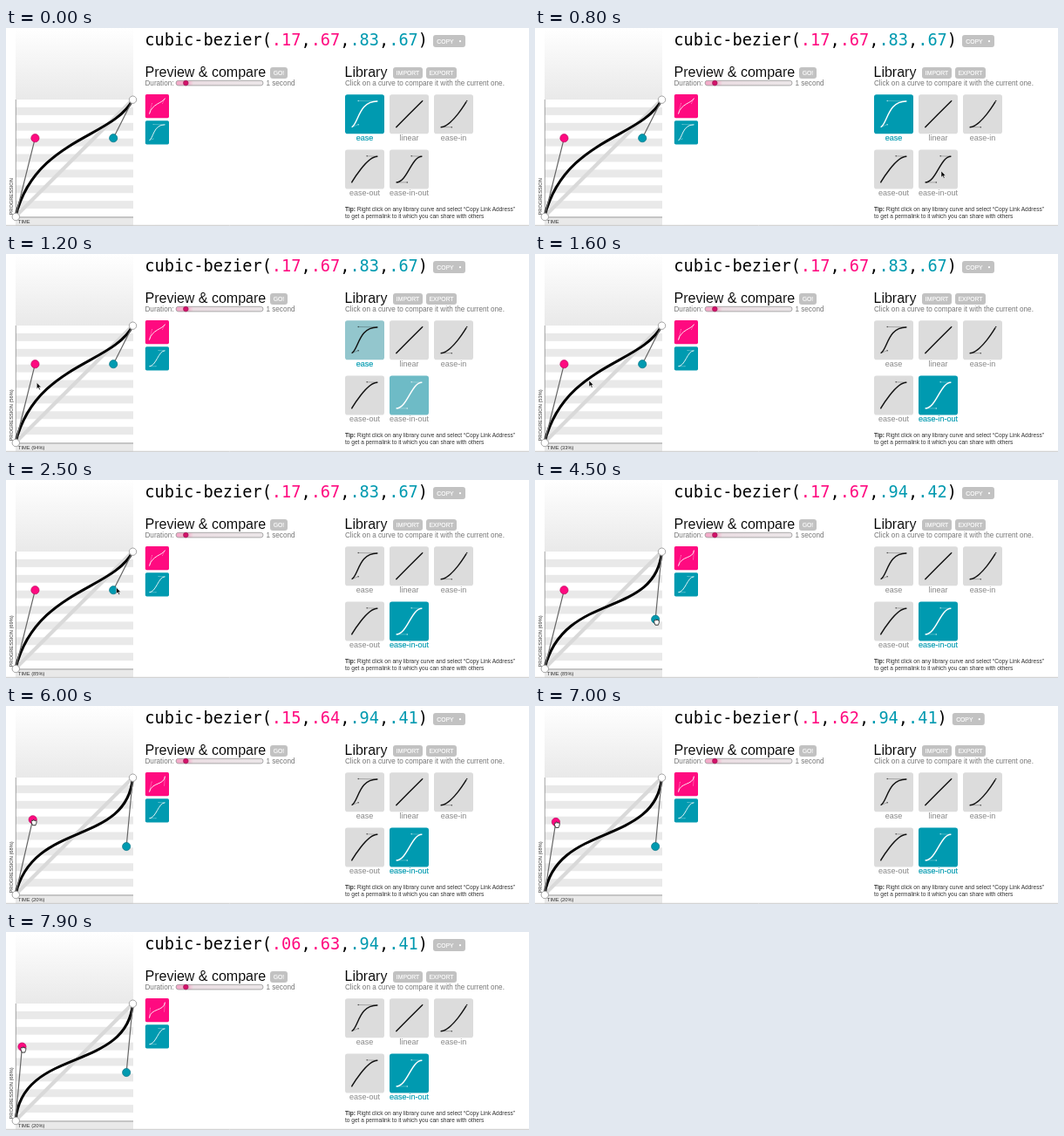
Animation, 600 px wide and 227 px high, one loop 8000 ms. Source, as an HTML page:

```html
<!DOCTYPE html>
<html lang="en">
<head>
<meta charset="utf-8">
<title>Cubic Bézier editor</title>
<style>
html, body { margin: 0; width: 100%; height: 100%; overflow: hidden; background: #fff; }
svg { display: block; width: 600px; height: 227px; font-family: "Liberation Sans", Arial, sans-serif; }
.code { font: 18.6px "DejaVu Sans Mono", monospace; white-space: pre; }
.head { font-size: 16px; fill: #000; stroke: #fff; stroke-width: .12px; }
.note { font-size: 8.13px; fill: #777; }
.tip { font-size: 6.55px; fill: #333; }
.axis { font-size: 5.7px; fill: #333; }
.name { font-size: 9px; text-anchor: middle; }
.btn rect { fill: #c2c2c2; }
.btn text { font-size: 6.8px; fill: #fff; text-anchor: middle; stroke: #fff; stroke-width: .15px; }
</style>
</head>
<body>
<svg id="stage" viewBox="0 0 600 227">
  <defs>
    <linearGradient id="shade" x2="0" y2="1">
      <stop stop-color="#fff"/><stop offset="1" stop-color="#e9e9e9"/>
    </linearGradient>
    <linearGradient id="rail">
      <stop stop-color="#f3a9c8"/><stop offset=".15" stop-color="#f0b9d0"/>
      <stop offset=".2" stop-color="#eadde2"/><stop offset="1" stop-color="#ebe6e8"/>
    </linearGradient>
  </defs>
  <rect x="11" width="135" height="82" fill="url(#shade)"/>
  <rect x="11" y="82" width="135" height="145" fill="#e9e9e9"/>
  <g id="stripes" fill="#fff"></g>
  <path d="M11 216L145.5 82" stroke="#d9d9d9" stroke-width="4.2"/>
  <path d="M11.3 82V217H146" fill="none" stroke="#999" stroke-width=".9"/>
  <path d="M0 226.3H600" stroke="#c8c8c8"/>
  <text id="prog" class="axis" transform="translate(8.2 214.5) rotate(-90)"></text>
  <text id="time" class="axis" x="14" y="223.6"></text>
  <path id="curve" fill="none" stroke="#000" stroke-width="3"/>
  <path id="stems" fill="none" stroke="#666" stroke-width="1.2"/>
  <g fill="#fff" stroke="#999" stroke-width=".9">
    <circle cx="11.3" cy="216.5" r="4.2"/><circle cx="145.5" cy="82.2" r="4.2"/>
  </g>
  <circle id="p1" r="4.6" fill="#ff0a80" stroke="#b8085c" stroke-width=".7"/>
  <circle id="p2" r="4.6" fill="#009ab0" stroke="#087484" stroke-width=".7"/>

  <text class="code" id="code" x="159.3" y="20"></text>
  <g class="btn" id="copy">
    <rect y="8" width="37" height="14" rx="3"/>
    <text x="14" y="17.8">COPY</text><circle cx="31" cy="15.2" r="1.1" fill="#fff"/>
  </g>
  <text class="head" x="159.5" y="55.5">Preview &amp; compare</text>
  <text class="note" x="159.5" y="66">Duration:</text>
  <rect x="195" y="60.3" width="100" height="5.6" rx="2.8" fill="url(#rail)" stroke="#999" stroke-width=".8"/>
  <circle cx="206.3" cy="63.1" r="2.8" fill="#d3126a" stroke="#a01c58" stroke-width=".7"/>
  <text class="note" x="298.5" y="66">1 second</text>
  <text class="head" x="388.5" y="55.5">Library</text>
  <text class="note" x="389" y="66">Click on a curve to compare it with the current one.</text>
  <g id="buttons"></g>
  <g id="tiles"></g>
  <text class="tip" x="389" y="209.5"><tspan font-weight="bold">Tip:</tspan> Right click on any library curve and select “Copy Link Address”</text>
  <text class="tip" x="389" y="218">to get a permalink to it which you can share with others</text>
  <path id="arrow" d="M0 0V7.2L1.7 5.6L2.9 8.2L4.1 7.7L2.9 5.2H5.1Z" fill="#000" stroke="#fff" stroke-width=".5"/>
  <path id="hand" d="M-2.7 0C-3.2 -1.8 -1.8 -2.3 -1.4 -1.3C-1.4 -3.2 .2 -3.2 .3 -1.6C.5 -3 1.8 -2.7 1.8 -1.4C2.3 -2.2 3.4 -1.6 3.1 0C3 1.8 2.3 2.2 2.1 3.6H-1.4C-1.6 2.2 -2.7 1.4 -2.7 0Z" fill="#fff" stroke="#222" stroke-width=".9"/>
</svg>
<script>
const LOOP = 8000, STEP = 100, CLICK = 900, FADE = 600;
const PINK = "#ff0a80", TEAL = "#009ab0";
const EASE = [.25, .1, .25, 1], IN_OUT = [.42, 0, .58, 1];
const LEFT = 10.3, BOTTOM = 216, WIDE = 136, HIGH = 134;
const $ = id => document.getElementById(id);
const clamp = (v, a, b) => Math.min(b, Math.max(a, v));

function set(el, attrs) {
  for (const k in attrs) el.setAttribute(k, attrs[k]);
}
function make(parent, tag, attrs, text) {
  const el = document.createElementNS("http://www.w3.org/2000/svg", tag);
  set(el, attrs);
  if (text) el.textContent = text;
  return parent.appendChild(el);
}
const show = (el, on) => el.setAttribute("visibility", on ? "visible" : "hidden");
const move = (el, x, y) => el.setAttribute("transform", `translate(${x} ${y})`);

// Keys are [time, x, y]
function track(keys, t) {
  const i = keys.findIndex(k => t <= k[0]);
  if (i === 0) return keys[0].slice(1);
  if (i < 0) return keys[keys.length - 1].slice(1);
  const [t0, x0, y0] = keys[i - 1], [t1, x1, y1] = keys[i];
  const k = (t - t0) / (t1 - t0);
  return [x0 + (x1 - x0) * k, y0 + (y1 - y0) * k];
}
const P1 = [[5700, .17, .67], [6000, .15, .64], [6600, .12, .62], [7000, .1, .62], [7500, .07, .62], [7700, .06, .63]];
const P2 = [[2700, .83, .67], [3400, .9, .57], [3600, .92, .53], [4500, .94, .42], [4700, .94, .41]];
const MOUSE = [[100, 505, 190], [600, 466, 164], [950, 466, 164], [1100, 138.2, 141], [1200, 35.3, 147.5],
  [1600, 62, 145], [2300, 126.5, 123.2], [2700, 126.5, 123.2], [5200, 138, 160], [5400, 37.9, 124.9], [5500, 34, 127]];

for (let i = 0; i < 8; i++)
  make($("stripes"), "rect", { x: 11, y: 82 + i * 17.87, width: 135, height: 8.93 });

function button(x, w, label) {
  const g = make($("buttons"), "g", { class: "btn" });
  make(g, "rect", { x, y: 45, width: w, height: 13, rx: 3 });
  make(g, "text", { x: x + w / 2, y: 54 }, label);
}
button(303, 20, "GO!");
button(444, 34, "IMPORT");
button(482, 35, "EXPORT");

function tile(x, y, size, fill, label) {
  const g = make($("tiles"), "g", { transform: `translate(${x} ${y})` });
  const box = make(g, "rect", { width: size, height: size, rx: size / 16, fill });
  const stem = make(g, "path", { fill: "none", "stroke-width": .5, opacity: .55 });
  const line = make(g, "path", { fill: "none", "stroke-width": size / 31 });
  const dots = [0, 1].map(() => make(g, "circle", { r: size / 60, opacity: .7 }));
  const name = label && make(g, "text", { class: "name", x: size / 2, y: size + 7.8 }, label);
  return { size, box, stem, line, dots, name };
}
function plot(el, c, color) {
  const s = el.size * .67, lo = el.size * .17, hi = el.size * .83;
  const [a, b, d, e] = c.map((v, i) => i % 2 ? hi - v * s : lo + v * s);
  set(el.line, { d: `M${lo} ${hi}C${a} ${b} ${d} ${e} ${hi} ${lo}`, stroke: color });
  set(el.stem, { d: `M${lo} ${hi}L${a} ${b}M${hi} ${lo}L${d} ${e}`, stroke: color });
  set(el.dots[0], { cx: a, cy: b, fill: color });
  set(el.dots[1], { cx: d, cy: e, fill: color });
}
const current = tile(159.8, 76, 27.2, PINK);
const compared = tile(159.8, 106.2, 27.2, TEAL);
const [ease, , , , inOut] = [
  ["ease", 389, 76.3, EASE], ["linear", 440, 76.3, [0, 0, 1, 1]], ["ease-in", 491, 76.3, [.42, 0, 1, 1]],
  ["ease-out", 389, 139.6, [0, 0, .58, 1]], ["ease-in-out", 440, 139.6, IN_OUT]
].map(([label, x, y, c]) => {
  const el = tile(x, y, 45, "#dcdcdc", label);
  el.name.setAttribute("fill", "#888");
  plot(el, c, "#111");
  return el;
});

// k is 0 for idle, 1 for selected
function select(el, c, k, on, lit) {
  const mix = [0, 154, 176].map(v => Math.round(220 + (v - 220) * k));
  el.box.setAttribute("fill", `rgb(${mix})`);
  plot(el, c, on ? "#fff" : "#111");
  set(el.name, { fill: lit ? TEAL : "#888", stroke: lit ? TEAL : "none", "stroke-width": .15 });
}

const num = v => String(v).replace(/^0\./, ".");

function draw(t) {
  const c = [...track(P1, t), ...track(P2, t)].map(v => +v.toFixed(2));
  const [x1, y1, x2, y2] = c.map((v, i) => i % 2 ? BOTTOM - v * HIGH : LEFT + v * WIDE);
  $("curve").setAttribute("d", `M11 216C${x1} ${y1} ${x2} ${y2} 145.5 82`);
  $("stems").setAttribute("d", `M11 216L${x1} ${y1}M145.5 82L${x2} ${y2}`);
  set($("p1"), { cx: x1, cy: y1 });
  set($("p2"), { cx: x2, cy: y2 });

  const code = $("code"), parts = c.map(num);
  code.textContent = "cubic-bezier(";
  parts.forEach((p, i) => {
    make(code, "tspan", { fill: i < 2 ? PINK : TEAL }, p);
    make(code, "tspan", {}, i < 3 ? "," : ")");
  });
  const missing = 12 - parts.join("").length;
  move($("copy"), 490 - missing * 11.2, 0);

  // The old choice fades out a little faster than the new one fades in
  const picked = t >= CLICK, done = t >= CLICK + FADE;
  const fade = ms => clamp((t - CLICK) / ms, 0, 1);
  select(ease, EASE, 1 - fade(FADE * .75), !picked, !done);
  select(inOut, IN_OUT, fade(FADE), picked, done);
  plot(current, c, "#fff");
  plot(compared, picked ? IN_OUT : EASE, "#fff");

  // The readout lags the pointer and rests while a handle is held
  const [lx, ly] = track(MOUSE, t < 5200 ? Math.min(t - 100, 2300) : Math.min(t, 5400));
  const pct = v => t >= 1200 ? ` (${Math.round(v * 100)}%)` : "";
  $("time").textContent = "TIME" + pct((lx - LEFT) / WIDE);
  $("prog").textContent = "PROGRESSION" + pct((BOTTOM - ly) / HIGH);

  const holdB = t >= 2700 && t < 5200, holdA = t >= 5600;
  show($("hand"), holdA || holdB);
  show($("arrow"), t >= 100 && !holdA && !holdB);
  move($("hand"), (holdA ? x1 : x2) + 1.2, (holdA ? y1 : y2) + 2.9);
  move($("arrow"), ...track(MOUSE, t));
}

const start = performance.now();
function tick() {
  const t = (performance.now() - start) % LOOP;
  draw(Math.floor(t / STEP) * STEP);
  requestAnimationFrame(tick);
}
tick();
</script>
</body>
</html>
```
